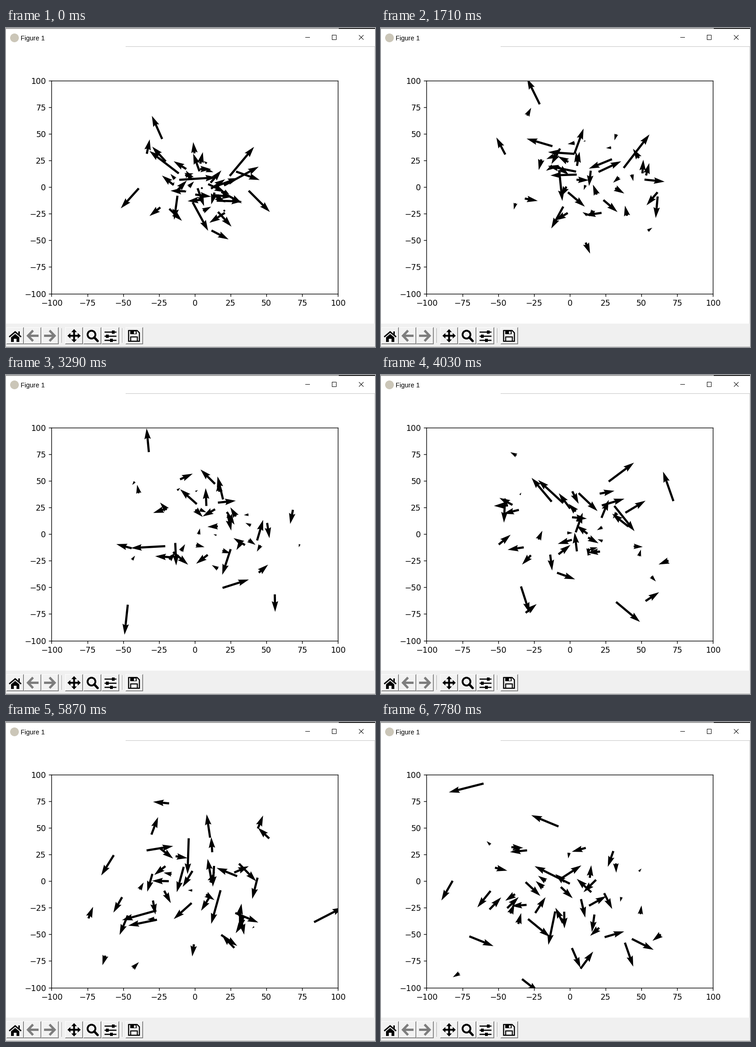
A matplotlib script for the animation above (8 s loop, 805x696 px).

```python
import matplotlib.pyplot as plt
import numpy as np
from matplotlib.animation import FuncAnimation
from matplotlib.patches import Circle, Polygon, Rectangle

W, H, DPI = 805, 696, 125
PX = 72 / DPI
LOOP, STEP = 8000, 40
COUNT, SIGMA, WARMUP = 50, 9.2, 3

# Moments (ms) at which the walkers take their next step.
TICKS = [190, 520, 800, 1000, 1290, 1710, 2030, 2430, 2770, 3090, 3290, 3620,
         3920, 4330, 4740, 5040, 5460, 5770, 6090, 6530, 6840, 7260, 7680]


def random_walk():
    """Walk from the origin; each arrow is the walker's latest step.

    The cloud as a whole drifts along a few key points while it widens.
    """
    rng = np.random.default_rng(4)
    states = np.arange(len(TICKS) + 1)
    steps = rng.normal(0, SIGMA, (WARMUP + len(states) - 1, COUNT, 2))
    pos = np.cumsum(steps, axis=0)[WARMUP - 1:]
    vel = steps[WARMUP - 1:]

    keys = [0, 6, 11, 23]
    centre = np.stack([np.interp(states, keys, [2, 12, 9, -9]),
                       np.interp(states, keys, [1, 11, 5, -15])], axis=1)
    spread = 16 + 4 * np.sqrt(states)
    pos = (pos - pos.mean(1, keepdims=True)) / pos.std(1, keepdims=True)
    return centre[:, None] + pos * spread[:, None, None], vel


fig = plt.figure(figsize=(W / DPI, H / DPI), dpi=DPI, facecolor="white")
win = fig.add_axes([0, 0, 1, 1])
win.set(xlim=(0, W), ylim=(H, 0))
win.axis("off")


def line(*pts, w=1, color="black", cap="butt"):
    win.plot(*zip(*pts), lw=w * PX, color=color, solid_capstyle=cap,
             solid_joinstyle="miter", snap=False)


def rect(x0, y0, x1, y1, color="black"):
    win.add_patch(Rectangle((x0, y0), x1 - x0, y1 - y0, fc=color, lw=0))


def poly(*pts, color="black"):
    win.add_patch(Polygon(pts, fc=color, lw=0))


def button(x0, x1, y0=653, y1=690):
    rect(x0, y0, x1, y1, "#6d6d6d")
    rect(x0, y0, x1 - 1, y1 - 1, "white")
    rect(x0 + 1, y0 + 1, x1 - 1, y1 - 1, "#a5a5a5")
    rect(x0 + 1, y0 + 1, x1 - 2, y1 - 2, "#f2f2f2")


def title_bar():
    rect(0, 0, W, 2, "#a0a0a0")
    rect(726, 0, W, 2, "#1c1c1c")
    win.add_patch(Circle((18.5, 21.5), 9.5, fc="#cbc6b8", lw=0))
    win.text(31.5, 27, "Figure 1", family="Liberation Sans", size=14.3 * PX)
    line((653, 20.5), (663, 20.5))
    line((711.5, 15.5), (720.5, 15.5), (720.5, 25.5), (711.5, 25.5), (711.5, 15))
    line((770, 15.5), (780, 25.5))
    line((770, 25.5), (780, 15.5))
    rect(261, 40, W, 41, "#c4c4c4")
    rect(804, 41, W, H, "#d0d0d0")


def home_icon():
    line((7, 674), (20, 663), (33, 674), w=3)
    rect(27, 662, 30, 670)
    poly((11, 675), (20, 667.5), (29, 675), (29, 685), (23, 685), (23, 678),
         (17, 678), (17, 685), (11, 685))


def history_icon(x, side):
    grey = "#7d7d7d"
    line((x, 660), (x - 11 * side, 671.5), (x, 683), w=5, color=grey)
    line((x - 9 * side, 671.5), (x + 12 * side, 671.5), w=5, color=grey)


def pan_icon(x=148.5, y=671.5):
    line((x - 10, y), (x + 10, y), w=4)
    line((x, y - 10), (x, y + 10), w=4)
    for dx, dy in [(1, 0), (-1, 0), (0, 1), (0, -1)]:
        bx, by = x + 8 * dx, y + 8 * dy
        poly((x + 14.5 * dx, y + 14.5 * dy), (bx + 6 * dy, by + 6 * dx),
             (bx - 6 * dy, by - 6 * dx))


def zoom_icon():
    win.add_patch(Circle((186.5, 669), 8.5, fc="none", ec="black", lw=4 * PX))
    line((192.5, 675), (200, 683), w=5, cap="round")


def sliders_icon():
    for y, knob in [(663.5, 234), (672.5, 221), (681.5, 230)]:
        line((215, y), (241, y), w=2.5)
        rect(knob - 3, y - 3.5, knob + 3, y + 3.5)


def save_icon():
    line((267.5, 660), (286, 660), (291, 665), (291, 683.5), (267.5, 683.5),
         (267.5, 659), w=2.4)
    rect(271, 660, 285, 668)
    rect(279, 661.5, 282.5, 666.5, "#f2f2f2")
    line((272, 683), (272, 674), (286.5, 674), (286.5, 683), w=2.2)


def toolbar():
    rect(0, 645, W, H, "#f0f0f0")
    for x0, x1 in [(1, 39), (39, 77), (77, 115), (129, 168), (169, 208),
                   (209, 247), (261, 299)]:
        button(x0, x1)
    for x in (121, 253):
        rect(x, 655, x + 1, 687, "#a0a0a0")
        rect(x + 1, 655, x + 2, 687, "white")
    home_icon()
    history_icon(59, 1)
    history_icon(95, -1)
    pan_icon()
    zoom_icon()
    sliders_icon()
    save_icon()
    rect(0, 695, W, H, "#b4b4b4")


title_bar()
toolbar()

ax = fig.add_axes([99.4 / W, 116.4 / H, 625 / W, 465 / H])
marks = np.arange(-100, 101, 25)
ax.set(xlim=(-100, 100), ylim=(-100, 100), xticks=marks, yticks=marks)

pos, vel = random_walk()
arrows = ax.quiver(*pos[0].T, *vel[0].T, scale=1, scale_units="x", color="black")


def update(k):
    state = np.searchsorted(TICKS, (k + 1) * STEP - 1, side="right")
    arrows.set_offsets(pos[state])
    arrows.set_UVC(*vel[state].T)
    return (arrows,)


anim = FuncAnimation(fig, update, frames=LOOP // STEP, interval=STEP,
                     repeat=True, repeat_delay=0)
plt.show()
```
